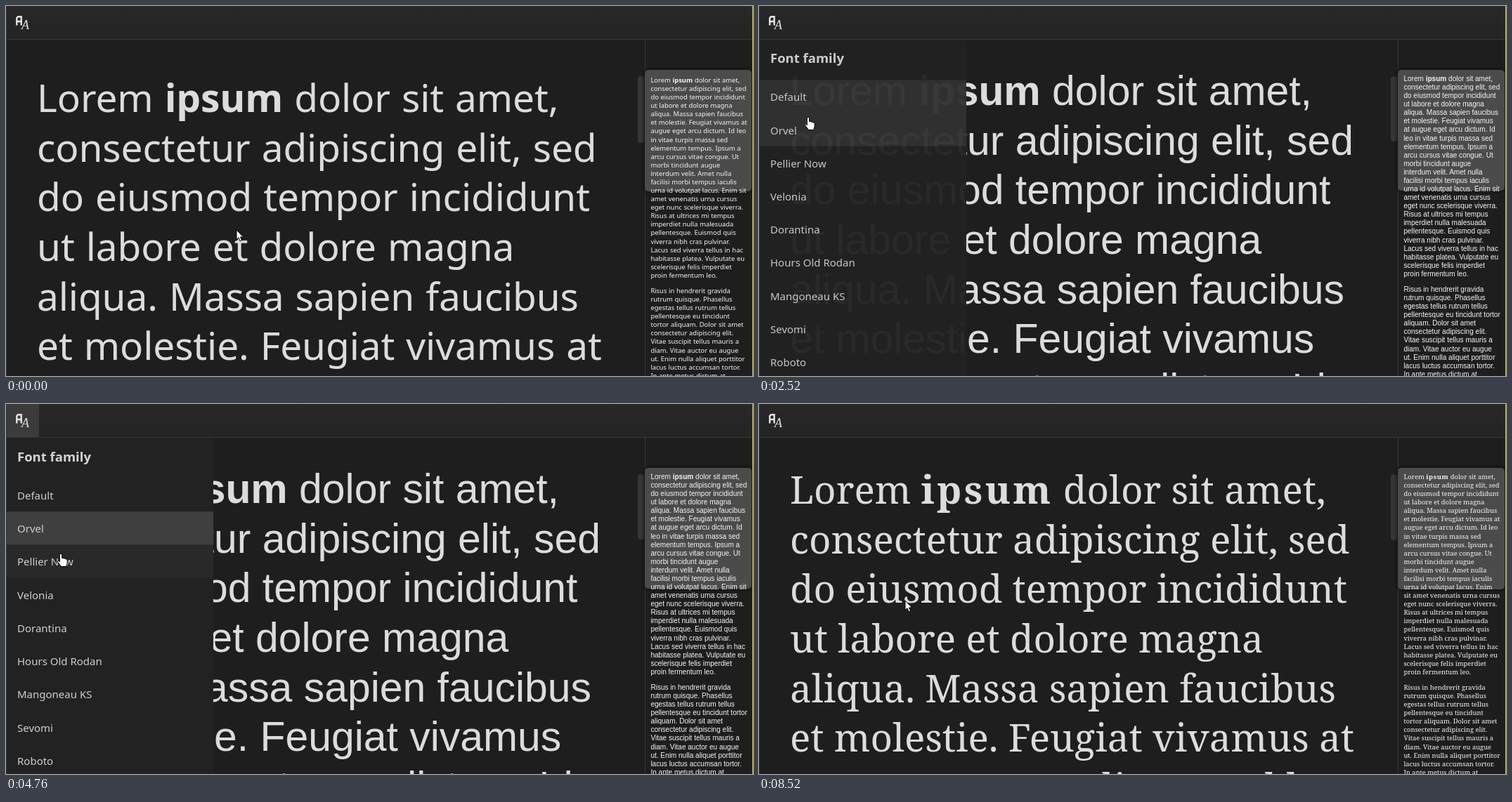
An HTML page that plays this animation: 1063x527 px, repeating every 9480 ms.

```html
<!DOCTYPE html>
<html lang="en">
<head>
<meta charset="utf-8">
<title>Font family menu</title>
<style>
  html, body { margin: 0; width: 100%; height: 100%; overflow: hidden; background: #1e1e1e; }
  svg { display: block; width: 1063px; height: 527px; font-family: "Noto Sans", sans-serif; }
  text { white-space: pre; }
  .page { fill: #dcdcdc; }
  .mini { fill: #f6f6f6; }
  .strong { font-weight: 700; letter-spacing: var(--strong); }
  .semi .strong { font-weight: 600; }
  /* A background-coloured outline slims the glyphs. */
  .page.thin { stroke: #1e1e1e; stroke-width: 1.4px; }
  .page.thin .strong { stroke: none; }
  .item { font-size: 15px; fill: #cfcfcf; }
  .heading { font-size: 18.5px; font-weight: 600; fill: #d4d4d4; }
  #tip text { text-anchor: middle; font-weight: 600; }
</style>
</head>
<body>
<svg viewBox="0 0 1063 527">
  <defs>
    <linearGradient id="bar" x2="0" y2="1">
      <stop stop-color="#282828"/><stop offset="1" stop-color="#242424"/>
    </linearGradient>
    <filter id="blur" x="-20%" y="-20%" width="140%" height="140%"><feGaussianBlur stdDeviation="2"/></filter>
    <clipPath id="side"><rect x="910" y="48" width="151" height="479"/></clipPath>
  </defs>
  <rect width="1063" height="527" fill="#1e1e1e"/>
  <g id="pages"></g>
  <rect id="thumb" x="899" width="9" rx="4" fill="#363636"/>
  <rect x="909" y="48" width="1" height="479" fill="#383838"/>
  <rect id="shade" x="909" width="152" rx="5" fill="none" stroke="#000" stroke-opacity=".6" stroke-width="3" filter="url(#blur)"/>
  <rect id="view" x="909" width="152" rx="5" fill="#4b4b4b"/>
  <g id="minis" clip-path="url(#side)"></g>
  <g id="menu">
    <rect x="1" y="30" width="294" height="520" fill="#222"/>
    <text class="heading" x="16" y="82">Font family</text>
    <g id="rows"></g>
  </g>
  <rect width="1063" height="47" fill="url(#bar)"/>
  <rect y="47" width="1063" height="1" fill="#3a3a3a"/>
  <rect id="button" x="1" width="46" height="47"/>
  <path d="M15.3 27.5V17.3L17 15.3H21.7V27.5M15.3 22H21.7" fill="none" stroke="#e4e4e4" stroke-width="2.4"/>
  <text x="22" y="33" font-size="18" font-style="italic" fill="#dedede" style="font-family:'Liberation Serif',serif">A</text>
  <rect id="splitter" x="1" y="44" width="1061" height="4" fill="#4a3a70"/>
  <rect width="1" height="527" fill="#343434"/>
  <rect x="1062" width="1" height="527" fill="#e0c41c"/>
  <g id="tip">
    <rect x="1" y="57" width="174" height="51.5" rx="4" fill="#020202"/>
    <text x="88" y="78" font-size="12.8" fill="#fff">Font family</text>
    <text x="88" y="99" font-size="11.7" fill="#c8c8c8">Typeface for text elements</text>
  </g>
  <g id="cursor" fill="#fff" stroke="#000" stroke-linejoin="round">
    <path id="arrow" d="M0 0V13.5L3 10.8L5.2 16L7.6 15L5.4 10H9.6Z"/>
    <path id="hand" d="M-1.6 12V1.2Q0-.8 1.6 1.2V6.5Q3.4 5.6 4.3 7.1Q6 6.4 6.9 7.9Q9 7.4 9.2 9.4V13Q9 16 7.5 18.5H.5Q-1 16-4.2 12.2Q-5 10-3.2 10Q-2.2 10.3-1.6 12Z"/>
  </g>
</svg>
<script>
const LOOP = 9480, STEP = 40;
const EM = 58.9, LEADING = 70.67, MINI = 1 / 5.85;
const PAGE_X = 44, MINI_X = 917.4;
const $ = id => document.getElementById(id);

const first = `Lorem ipsum dolor sit amet,|consectetur adipiscing elit, sed|do eiusmod tempor incididunt|ut labore et dolore magna|aliqua. Massa sapien faucibus|et molestie. Feugiat vivamus at|augue eget arcu dictum. Id leo|in vitae turpis massa sed|elementum tempus. Ipsum a|arcu cursus vitae congue. Ut|morbi tincidunt augue|interdum velit. Amet nulla|facilisi morbi tempus iaculis|urna id volutpat lacus. Enim sit|amet venenatis urna cursus|eget nunc scelerisque viverra.|Risus at ultrices mi tempus|imperdiet nulla malesuada|pellentesque. Euismod quis|viverra nibh cras pulvinar.|Lacus sed viverra tellus in hac|habitasse platea. Vulputate eu|scelerisque felis imperdiet|proin fermentum leo.`;
const second = `Risus in hendrerit gravida|rutrum quisque. Phasellus|egestas tellus rutrum tellus|pellentesque eu tincidunt|tortor aliquam. Dolor sit amet|consectetur adipiscing elit.|Vitae suscipit tellus mauris a|diam. Vitae auctor eu augue|ut. Enim nulla aliquet porttitor|lacus luctus accumsan tortor.|In ante metus dictum at`;

// Each rewrap turns the shared line breaks into those of one font.
const rebreak = (...pairs) => text => pairs.reduce((s, [from, to]) => s.replace(from, to), text);
const wrapAt = limit => text => {
  let length = 0;
  return text.replaceAll('|', ' ').split(' ').reduce((out, word) => {
    const fits = length + 1 + word.length <= limit;
    length = out && fits ? length + 1 + word.length : word.length;
    return out + (out ? (fits ? ' ' : '|') : '') + word;
  }, '');
};

const fonts = [
  { family: '"Noto Sans", sans-serif', size: 55, letter: -.002, word: .033, base: 151, mini: 109,
    view: [91, 173], thumb: [100, 95], look: 'semi', rewrap: rebreak() },
  { family: '"Liberation Sans", sans-serif', size: EM, base: 141, mini: 107,
    view: [91, 172], thumb: [100, 93],
    rewrap: rebreak(['vivamus at|', 'vivamus|at '], ['Id leo|in', 'Id|leo in'], ['tincidunt|tortor aliq', 'tincidunt tortor|aliq']) },
  { family: '"Liberation Mono", monospace', size: 51, letter: .094, indent: 2.4, base: 136, mini: 93,
    view: [78, 171], thumb: [87, 67], look: 'thin', rewrap: wrapAt(22) },
  { family: '"Noto Serif", serif', size: 54.7, strong: .06, base: 142, mini: 107,
    view: [91, 173], thumb: [100, 94], rewrap: rebreak(['Enim sit|', 'Enim|sit ']) }
];
const fontChanges = [2520, 5120, 8120];
const names = ['Default', 'Orvel', 'Pellier Now', 'Velonia', 'Dorantina', 'Hours Old Rodan', 'Mangoneau KS', 'Sevomi', 'Roboto'];
const ROW_TOP = 106, ROW = 47.22;

// Start, end and destination of every pointer move.
const moves = [
  [40, 700, 21, 31], [1620, 2240, 70, 158], [3040, 3700, 22, 29], [4280, 4760, 78, 213],
  [5140, 5400, 253, 256], [6000, 6480, 24, 33], [7260, 7800, 84, 262], [8180, 8520, 208, 280]
];
const menus = [[1440, 2480], [4120, 5080], [7080, 8080]];
const tips = [[630, 1200], [3590, 4000], [6430, 6920]];

function add(parent, tag, attrs, content = '') {
  const el = document.createElementNS('http://www.w3.org/2000/svg', tag);
  for (const key in attrs) el.setAttribute(key, attrs[key]);
  el.innerHTML = content;
  return parent.appendChild(el);
}

function addText(parent, font, cls, left, base, scale, paragraphs) {
  const { family, size, letter = 0, word = 0, strong = letter, indent = 0, look = '' } = font;
  const group = add(parent, 'g', {
    class: `${cls} ${look}`,
    style: `font-family:${family};font-size:${size * scale}px;` +
      `letter-spacing:${letter}em;word-spacing:${word}em;--strong:${strong}em`
  });
  const x = left + indent * scale;
  let y = base;
  for (const lines of paragraphs) {
    for (const line of lines) {
      add(group, 'text', { x, y }, line.replace(' ipsum ', ' <tspan class="strong">ipsum</tspan> '));
      y += LEADING * scale;
    }
    y += EM * scale;
  }
  return group;
}

const layers = fonts.map(font => {
  const paragraphs = [first, second].map(text => font.rewrap(text).split('|'));
  return [
    addText($('pages'), font, 'page', PAGE_X, font.base, 1, [paragraphs[0].slice(0, 7)]),
    addText($('minis'), font, 'mini', MINI_X, font.mini, MINI, paragraphs)
  ];
});

const rows = names.map((name, i) => {
  const y = ROW_TOP + i * ROW;
  const back = add($('rows'), 'rect', { x: 1, y, width: 294, height: ROW, fill: '#fff' });
  add($('rows'), 'text', { class: 'item', x: 16, y: y + 30 }, name);
  return back;
});

const clamp = v => Math.min(1, Math.max(0, v));
const linear = (t, a, b) => clamp((t - a) / (b - a));
const ease = (t, a, b) => { const p = linear(t, a, b); return p * p * (3 - 2 * p); };
const easeOut = (t, a, b) => { const p = linear(t, a, b); return p * (2 - p); };
const show = (el, on) => { el.style.display = on ? '' : 'none'; };
const span = (el, [y, height]) => { el.setAttribute('y', y); el.setAttribute('height', height); };

function pointerAt(t) {
  return moves.reduce(([x, y], [a, b, tx, ty]) => {
    const p = ease(t, a, b);
    return [x + (tx - x) * p, y + (ty - y) * p];
  }, [328, 319]);
}

function draw(t) {
  const current = fontChanges.filter(change => t >= change).length;
  const font = fonts[current];
  layers.forEach(pair => pair.forEach(el => show(el, pair === layers[current])));
  span($('thumb'), font.thumb);
  span($('view'), font.view);
  span($('shade'), font.view);

  const [x, y] = pointerAt(t);
  const alpha = menus.reduce((sum, [a, b]) => sum + ease(t, a, a + 320) - ease(t, b, b + 320), 0);
  const open = menus.some(([a, b]) => t > a && t <= b);
  $('menu').setAttribute('opacity', alpha);
  $('menu').setAttribute('transform', `translate(0 ${(alpha - 1) * 16})`);
  show($('menu'), alpha > 0);

  const hovered = x < 295 ? Math.floor((y - ROW_TOP) / ROW) : -1;
  const swap = i => i < 0 ? 1 : i < 3 ? ease(t, fontChanges[i] - 40, fontChanges[i] + 40) : 0;
  rows.forEach((row, i) => {
    const selected = swap(i - 1) - swap(i);
    row.setAttribute('fill-opacity', Math.max(.13 * selected, i === hovered ? .03 : 0));
  });

  const overButton = x < 47 && y < 43;
  $('button').setAttribute('fill', open ? '#3b3b3b' : overButton ? '#343434' : 'none');
  $('splitter').setAttribute('opacity', ease(t, 3460, 3560) - ease(t, 3600, 3720));

  const tip = tips.find(([a, b]) => t > a && t < b);
  show($('tip'), tip);
  if (tip) {
    const scale = easeOut(t, tip[0], tip[0] + 320);
    $('tip').setAttribute('transform', `translate(88 83) scale(${scale}) translate(-88 -83)`);
  }

  const pointing = (x < 47 && y < 48) || (alpha > .5 && hovered >= 0);
  show($('hand'), pointing);
  show($('arrow'), !pointing);
  $('cursor').setAttribute('transform', `translate(${Math.round(x)} ${Math.round(y)})`);
}

const start = performance.now();
function tick() {
  const t = (performance.now() - start) % LOOP;
  draw(Math.floor(t / STEP) * STEP);
  requestAnimationFrame(tick);
}
tick();
</script>
</body>
</html>
```
